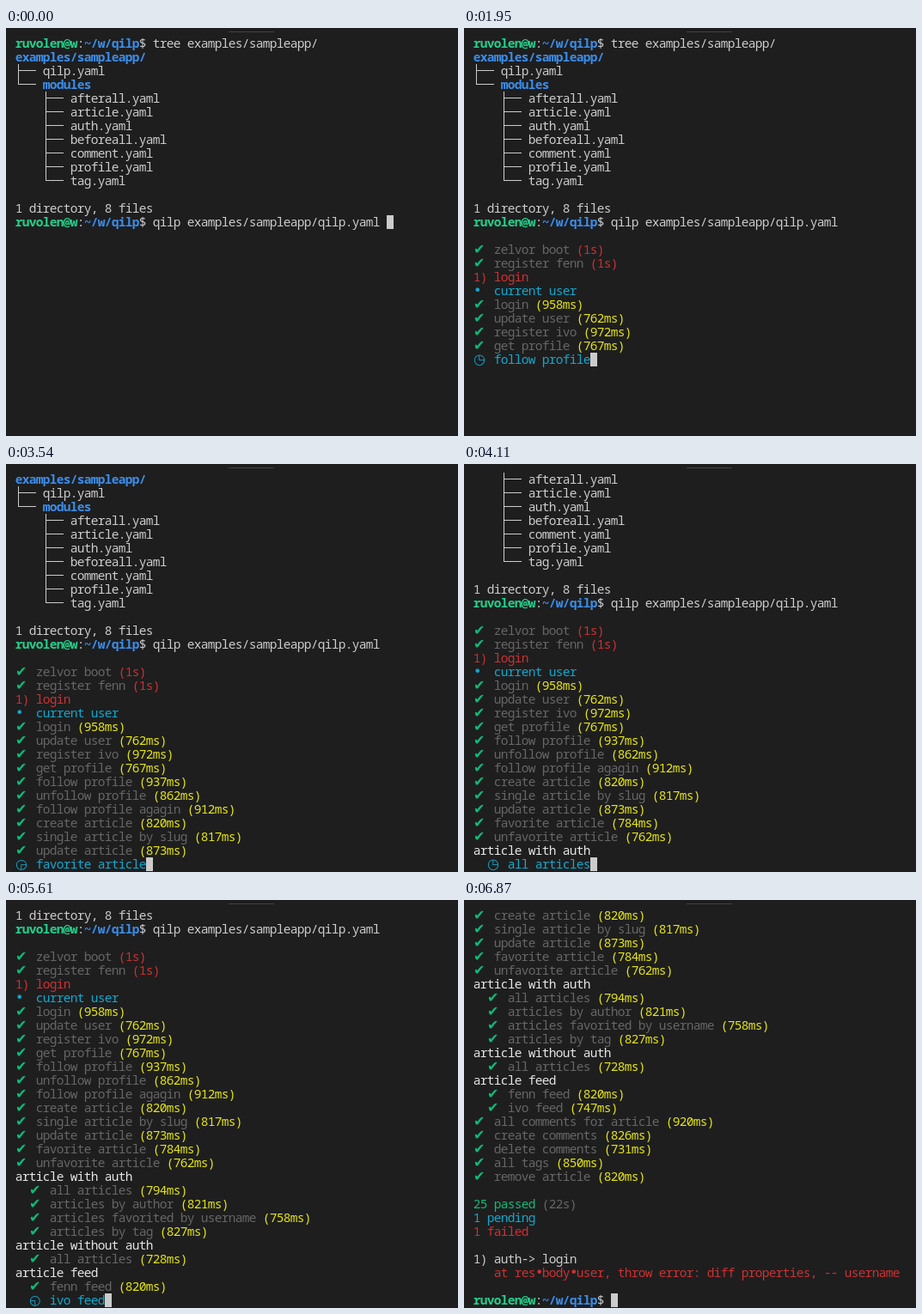
An HTML page with a canvas that plays this animation: 526x475 px, repeating every 7350 ms.

```html
<!DOCTYPE html>
<html lang="en">
<head>
<meta charset="utf-8">
<title>Terminal test run</title>
<style>
html, body { margin: 0; overflow: hidden; background: #1e1e1f; }
canvas { display: block; }
</style>
</head>
<body>
<canvas id="screen" width="526" height="475"></canvas>
<script>
const ctx = document.getElementById('screen').getContext('2d', { alpha: false });
const LOOP = 7350, TICK = 30, RUN_START = 120, SPIN_STEP = 36, SPEED = 0.3;
const COL = 8, ROW = 16, LEFT = 11, TOP = 10, ROWS = 29, BASELINE = 13;
const MONO = '14.5px "Noto Sans Mono", "DejaVu Sans Mono", monospace';
const ICON = '16px "DejaVu Sans", sans-serif';
const FG = '#cccccc', WHITE = '#e5e5e5', GRAY = '#666666', GREEN = '#0dbc79', YELLOW = '#e5e510',
  CYAN = '#11a8cd', RED = '#cd3131', LIME = '#23d18b', BLUE = '#3b8eea';

// A line is a list of [text, colour, bold] spans.
const span = (text, color = FG, bold = false) => [text, color, bold];
const prompt = (command = '') => [
  span('ruvolen@w', LIME, true), span(':'), span('~/w/qilp', BLUE, true), span('$ ' + command)
];

const files = ['afterall', 'article', 'auth', 'beforeall', 'comment', 'profile', 'tag'];
const intro = [
  prompt('tree examples/sampleapp/'),
  [span('examples/sampleapp/', BLUE, true)],
  [span('├── qilp.yaml')],
  [span('└── '), span('modules', BLUE, true)],
  ...files.map((name, i) => [span(`    ${i < files.length - 1 ? '├' : '└'}── ${name}.yaml`)]),
  [],
  [span('1 directory, 8 files')]
];
const command = 'qilp examples/sampleapp/qilp.yaml';

const summary = [
  [],
  [span('25 passed', GREEN), span(' (22s)', GRAY)],
  [span('1 pending', CYAN)],
  [span('1 failed', RED)],
  [],
  [span('1) auth-> login')],
  [span('   at res•body•user, throw error: diff properties, -- username', RED)],
  [],
  prompt()
];

// "#" marks a heading, "!" a failure, "?" a skipped test; the number is the run time in ms.
const tests = `zelvor boot:1160
register fenn:1250
!login:215
?current user
login:958
update user:762
register ivo:972
get profile:767
follow profile:937
unfollow profile:862
follow profile agagin:912
create article:820
single article by slug:817
update article:873
favorite article:784
unfavorite article:762
#article with auth
  all articles:794
  articles by author:821
  articles favorited by username:758
  articles by tag:827
#article without auth
  all articles:728
#article feed
  fenn feed:820
  ivo feed:747
all comments for article:920
create comments:826
delete comments:731
all tags:850
remove article:820`.split('\n').map(line => {
  const [, indent, mark, name, ms] = line.match(/^( *)([#!?]?)([^:]+):?(\d*)$/);
  return { indent, mark, name, ms: +ms };
});

function finished({ indent, mark, name, ms }) {
  if (mark === '#') return [span(name, WHITE)];
  if (mark === '?') return [span('•  ' + name, CYAN)];
  if (mark === '!') return [span('1) ' + name, RED)];
  const slow = ms >= 1000;
  return [
    span(indent + '✔  ', GREEN), span(name, GRAY),
    span(slow ? ' (1s)' : ` (${ms}ms)`, slow ? RED : YELLOW)
  ];
}

function linesAt(t) {
  if (t < RUN_START) return [...intro, prompt(command + ' ')];
  const lines = [...intro, prompt(command), []];
  let start = RUN_START;
  for (const test of tests) {
    const end = start + test.ms * SPEED;
    if (t < end) {
      const spinner = '◷◶◵◴'[Math.round((t - start) / SPIN_STEP) % 4];
      lines.push([span(`${test.indent}${spinner}  ${test.name}`, CYAN)]);
      return lines;
    }
    lines.push(finished(test));
    start = end;
  }
  return [...lines, ...summary];
}

function drawBranch(char, x, y) {
  if (char === '─') return ctx.fillRect(x, y + 7, COL, 1);
  ctx.fillRect(x + 3, y, 1, char === '├' ? ROW : 8);
  ctx.fillRect(x + 3, y + 7, 5, 1);
}

function drawSpan([text, color, bold], x, y) {
  ctx.fillStyle = color;
  [...text].forEach((char, i) => {
    const cx = x + i * COL;
    if ('├└─'.includes(char)) return drawBranch(char, cx, y);
    const icon = '✔•◷◶◵◴'.includes(char);
    ctx.font = icon ? ICON : (bold ? 'bold ' : '') + MONO;
    ctx.textAlign = icon ? 'left' : 'center';
    ctx.fillText(char, icon ? cx : cx + COL / 2, y + BASELINE);
  });
  return x + text.length * COL;
}

function draw(now) {
  const t = Math.floor((now % LOOP) / TICK) * TICK;
  ctx.fillStyle = '#1e1e1f';
  ctx.fillRect(0, 0, 526, 475);
  ctx.fillStyle = '#424242';
  ctx.fillRect(259, 4, 53, 1);

  const lines = linesAt(t).slice(-ROWS);
  let x = LEFT;
  lines.forEach((line, row) => {
    x = LEFT;
    for (const part of line) x = drawSpan(part, x, TOP + row * ROW);
  });
  ctx.fillStyle = FG;
  ctx.fillRect(x, TOP + (lines.length - 1) * ROW, COL, ROW);
}

const origin = performance.now();
function tick() {
  draw(performance.now() - origin);
  requestAnimationFrame(tick);
}
tick();
</script>
</body>
</html>
```
